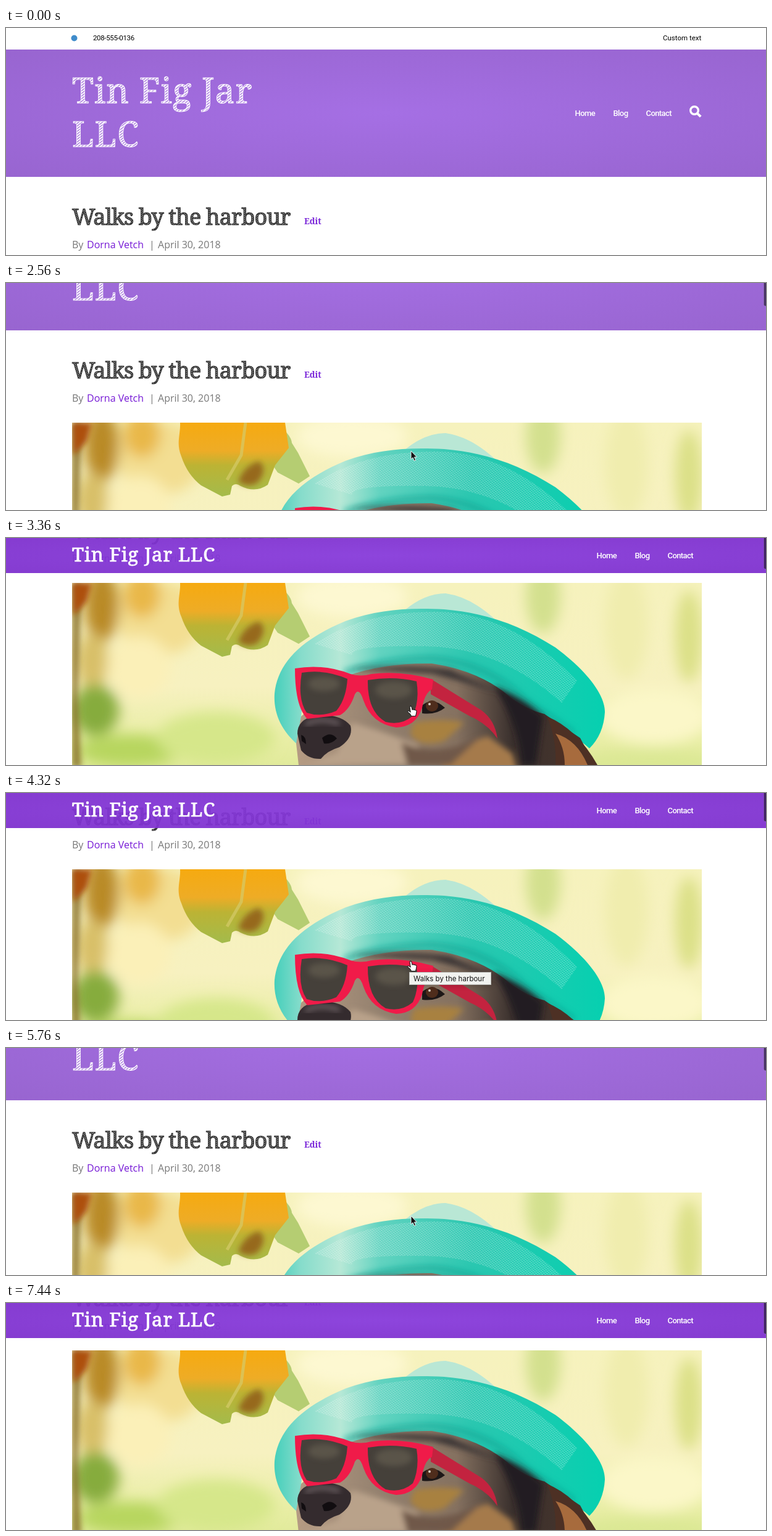
Recreate the animation shown at these times as an HTML page. Size 1231 by 369 pixels, loop 7840 ms.

```html
<!DOCTYPE html>
<html lang="en">
<head>
<meta charset="utf-8">
<title>Scrolling blog page</title>
<style>
  html, body { margin: 0; width: 100%; height: 100%; overflow: hidden; background: #fff; }
  svg { display: block; width: 1231px; height: 369px; }
  text { white-space: pre; }
  .logo { font: 57px "Noto Serif", serif; letter-spacing: 1px; fill: url(#hatch); stroke: #fff; stroke-width: .9; }
  .logo.small { font-size: 31px; letter-spacing: .9px; fill: #fff; stroke-width: .8; }
  .title { font: 36px "Noto Serif", serif; letter-spacing: -.9px; fill: url(#hatchDark); stroke: #333; stroke-width: 1.1; }
  .edit { font: bold 13.5px "Noto Serif", serif; fill: #7a26d9; }
  .by { font: 16px "Open Sans", sans-serif; fill: #777; }
  .by .link { fill: #7619d6; }
  .bar { font: 11.5px Roboto, sans-serif; fill: #000; }
  .menu { font: 500 13px Roboto, sans-serif; letter-spacing: -.6px; fill: #fff; }
  .tip { font: 11.5px Inter, sans-serif; fill: #111; }
</style>
</head>
<body>
<svg viewBox="0 0 1231 369">
  <defs>
    <pattern id="hatch" width="4" height="3.4" patternUnits="userSpaceOnUse" patternTransform="rotate(-38)">
      <rect width="4" height="2.1" fill="#fff"/>
    </pattern>
    <pattern id="hatchDark" width="3" height="2.6" patternUnits="userSpaceOnUse" patternTransform="rotate(-38)">
      <rect width="3" height="2.1" fill="#333"/>
    </pattern>
    <pattern id="weave" width="5" height="4" patternUnits="userSpaceOnUse" patternTransform="rotate(8)">
      <rect width="2.6" height="1.5" fill="#fff"/><rect x="2.5" y="2" width="2.6" height="1.5" fill="#fff"/>
    </pattern>
    <radialGradient id="banner" r=".707">
      <stop stop-color="#a56fe4"/><stop offset="1" stop-color="#9865d0"/>
    </radialGradient>
    <radialGradient id="sticky" r=".707">
      <stop stop-color="#8639da"/><stop offset="1" stop-color="#7d2fcd"/>
    </radialGradient>
    <linearGradient id="sky" x2="0" y2="1">
      <stop stop-color="#f6f2bd"/><stop offset=".4" stop-color="#f7f1c0"/>
      <stop offset=".6" stop-color="#e9eea6"/><stop offset="1" stop-color="#cbe07c"/>
    </linearGradient>
    <linearGradient id="straw">
      <stop stop-color="#45cfbb"/><stop offset=".08" stop-color="#86dccb"/><stop offset=".2" stop-color="#b6e8d6"/>
      <stop offset=".32" stop-color="#62d3c0"/><stop offset=".6" stop-color="#2ac7b0"/><stop offset="1" stop-color="#06d0b0"/>
    </linearGradient>
    <linearGradient id="leaf" x2="0" y2="1">
      <stop stop-color="#f6aa10"/><stop offset=".38" stop-color="#eeac26"/><stop offset=".58" stop-color="#bcb334"/><stop offset="1" stop-color="#a3bb4c"/>
    </linearGradient>
    <linearGradient id="fur">
      <stop stop-color="#b59b83"/><stop offset=".28" stop-color="#93806e"/><stop offset=".52" stop-color="#857160"/>
      <stop offset=".7" stop-color="#3a302d"/><stop offset="1" stop-color="#4b362b"/>
    </linearGradient>
    <filter id="blur" x="-50%" y="-50%" width="200%" height="200%"><feGaussianBlur stdDeviation="11"/></filter>
    <filter id="soft" x="-50%" y="-50%" width="200%" height="200%"><feGaussianBlur stdDeviation="5"/></filter>
    <clipPath id="photo"><rect x="107" y="73" width="1020" height="420"/></clipPath>
  </defs>

  <rect width="1231" height="369" fill="#fff"/>
  <g id="page">
    <circle cx="110.5" cy="16.5" r="5" fill="#3f8ccb"/>
    <text class="bar" x="141" y="20" letter-spacing="-.35">208-555-0136</text>
    <text class="bar" x="1064" y="20">Custom text</text>

    <rect y="35" width="1231" height="207" fill="url(#banner)"/>
    <text class="logo" x="107" y="122">Tin Fig Jar</text>
    <text class="logo" x="107" y="193">LLC</text>
    <g class="menu">
      <text x="921.5" y="143">Home</text><text x="983.5" y="143">Blog</text><text x="1036.5" y="143">Contact</text>
    </g>
    <g fill="none" stroke="#fff">
      <circle cx="1115" cy="134" r="6.3" stroke-width="3.4"/>
      <path d="M1119.8 138.8l5.4 5.4" stroke-width="4"/>
    </g>

    <text class="title" x="107" y="320">Walks by the harbour</text>
    <text class="edit" x="483" y="319">Edit</text>
    <g class="by">
      <text x="107" y="358">By</text><text class="link" x="131" y="358">Dorna Vetch</text>
      <text x="232" y="358">|</text><text x="246" y="358">April 30, 2018</text>
    </g>

    <g transform="translate(0 319)" clip-path="url(#photo)">
      <rect x="107" y="73" width="1020" height="420" fill="url(#sky)"/>
      <g id="blobs" filter="url(#blur)"></g>
      <path d="M107 73h17l-4 70-4 110 6 120h-15z" fill="#7d621a" opacity=".75" filter="url(#soft)"/>
      <path d="M107 73h32l-8 30-22 24z" fill="#ad4f08" filter="url(#soft)"/>

      <path d="M436 73Q462 92 463 106L473 122 492 160 474 172 440 154 424 130z" fill="#b5cd72"/>
      <path d="M282 73C283 92 275 106 284 128Q294 158 316 175L350 193 363 190 366 176Q372 170 380 176 404 188 424 174L436 142 458 114 452 73z" fill="url(#leaf)"/>
      <path d="M376 169Q386 142 410 136 425 148 408 170 394 180 376 169z" fill="#96691f" filter="url(#soft)"/>
      <path d="M388 73L381 126 358 166" fill="none" stroke="#d5cb68" stroke-width="5" opacity=".7"/>

      <path d="M645 118Q678 90 712 90 754 96 794 134z" fill="#b9e7d5"/>
      <path fill="url(#straw)" d="M474 337C445 313 433 283 435 253 440 204 476 166 550 135 604 116 650 113 710 116 780 122 835 143 890 178 942 217 970 255 970 283Q968 319 945 342C910 310 870 300 835 272L690 235H560L480 270z"/>
      <path d="M500 172Q580 118 700 120T925 232L900 268Q800 178 680 176T560 190z" fill="url(#weave)" opacity=".34"/>
      <path d="M548 219Q610 197 690 196 780 203 842 264L920 318" fill="none" stroke="#07a392" stroke-width="12" opacity=".5" filter="url(#soft)"/>

      <path d="M474 369L470 334 478 290 550 225Q610 203 690 204 760 215 805 249 838 278 872 286L930 325 970 400V493H470z" fill="url(#fur)"/>
      <g filter="url(#soft)">
        <path d="M660 300Q710 292 742 300L710 330Q668 342 655 318z" fill="#a8813f"/>
        <path d="M560 300L600 312 665 335 690 369H480L535 350z" fill="#b9a28a"/>
        <path d="M705 350L780 322 820 350 835 400H710z" fill="#a57a4b"/>
        <path d="M640 332Q700 360 770 322L720 369H650z" fill="#70594a"/>
        <path d="M790 240Q842 262 870 290L858 369H835Q830 300 790 240z" fill="#211d20"/>
        <path d="M560 214Q640 204 720 214L800 252 740 234 690 220 620 216z" fill="#3b3434"/>
      </g>
      <path d="M876 290Q925 310 958 369H890Q892 325 876 290z" fill="#4d3024"/>
      <path d="M890 318Q925 328 942 369H905Q905 340 890 318z" fill="#a76b3d"/>
      <path d="M674 272Q692 257 711 276 696 288 674 285z" fill="#1d1717"/>
      <ellipse cx="690" cy="273" rx="10" ry="9" fill="#4f2d1c"/>
      <circle cx="686" cy="270" r="2" fill="#d7d0c4"/>
      <path d="M472 318Q472 295 500 289 540 284 558 305 563 325 540 340 520 346 510 359 490 360 478 345z" fill="#342b2e"/>
      <path d="M485 303Q510 290 540 302" fill="none" stroke="#75696c" stroke-width="6" filter="url(#soft)"/>
      <path d="M512 325q14-12 24 1-10 10-21 8zM478 320q8 2 8 15l-7-5z" fill="#110d10"/>

      <path d="M688 229L770 280Q792 296 796 326 780 302 752 290L688 254z" fill="#c3233f"/>
      <path fill="#f01b49" d="M468 212Q515 204 558 221 574 226 592 221 640 215 692 230L690 246Q678 252 674 276 664 307 632 308 592 302 579 264 572 242 565 254 557 279 541 288L488 294Q468 274 468 212z"/>
      <g fill="#45403a">
        <path d="M479 219Q517 213 553 229 551 262 535 281 510 292 487 284 472 262 479 219z"/>
        <path d="M586 231Q627 224 665 233 670 265 659 289 641 305 615 299 585 282 586 231z"/>
      </g>
      <g fill="#756d5c" opacity=".45" filter="url(#soft)">
        <ellipse cx="515" cy="237" rx="26" ry="12"/><ellipse cx="628" cy="247" rx="30" ry="14"/>
      </g>
    </g>
  </g>

  <g id="fixed">
    <rect width="1231" height="57" fill="url(#sticky)" opacity=".94"/>
    <text class="logo small" x="107" y="38">Tin Fig Jar LLC</text>
    <g class="menu">
      <text x="956.5" y="33">Home</text><text x="1018.5" y="33">Blog</text><text x="1071.5" y="33">Contact</text>
    </g>
  </g>

  <rect id="thumb" x="1227.5" y="-40" width="8" rx="3" fill="#14101f" fill-opacity=".62" stroke="#fff" stroke-opacity=".12"/>

  <g id="tip">
    <rect x="654.5" y="293" width="132" height="20" fill="#000" opacity=".2" filter="url(#soft)"/>
    <rect x="653.5" y="291.5" width="132" height="20" fill="#f1f2ef" stroke="#b9bab6"/>
    <text class="tip" x="660" y="305.5">Walks by the harbour</text>
  </g>

  <g id="cursor">
    <path id="arrow" d="M0 0V13.5L3 10.8 5.2 16 7.6 15 5.4 10H9.4z" fill="#111" stroke="#fff" stroke-width=".9"/>
    <path id="hand" d="M-2 2Q-2 .4-.6.4.8.4 1 2L2 6.2Q4 5 4.8 6.4 6.6 5.6 7.2 7 8.8 6.6 9 8.4L8.6 12 7.4 16.5H.6L-1.4 13-5.4 9.6Q-5.8 7.6-3.6 8.2L-.8 10z" fill="#fff" stroke="#222" stroke-width="1.1"/>
  </g>
</svg>

<script>
  const LOOP = 7840, STEP = 80;
  const el = id => document.getElementById(id);
  const clamp = v => Math.max(0, Math.min(1, v));
  const show = (node, on) => node.setAttribute("visibility", on ? "visible" : "hidden");

  // Blurred background patches: x, y, rx, ry, colour
  const blobs = [
    [250, 130, 70, 60, "#f3de92"], [220, 92, 30, 38, "#e9b84a"],
    [155, 110, 28, 60, "#b98a28"], [140, 200, 26, 45, "#d8bf68"],
    [215, 210, 52, 50, "#fbf0b8"], [145, 280, 38, 42, "#86ac3c"],
    [200, 345, 85, 26, "#b7d65e"], [340, 325, 95, 42, "#d6e78a"],
    [560, 95, 90, 35, "#fdf8d1"], [870, 95, 28, 60, "#d3e08e"],
    [1005, 140, 35, 90, "#f0edae"], [1106, 160, 22, 75, "#dbe087"],
    [1050, 290, 90, 45, "#fbf7c8"], [1040, 368, 110, 24, "#dbe894"]
  ];
  el("blobs").innerHTML = blobs.map(([x, y, rx, ry, c]) =>
    `<ellipse cx="${x}" cy="${y}" rx="${rx}" ry="${ry}" fill="${c}"/>`).join("");

  // Scroll position over time: ms, px
  const stops = [
    [0, 0], [1440, 0], [1760, 27], [2560, 165], [3360, 319], [4080, 319],
    [4720, 107], [5200, 0], [5360, 0], [5760, 157], [6560, 315], [LOOP, 315]
  ];

  function slope(i) {
    const a = stops[i - 1], b = stops[i], c = stops[i + 1];
    if (!a || !c || a[1] === b[1] || b[1] === c[1]) return 0;
    return (c[1] - a[1]) / (c[0] - a[0]);
  }

  function scrollAt(t) {
    const i = stops.findIndex((s, n) => n && t <= s[0]) - 1;
    const [t0, y0] = stops[i], [t1, y1] = stops[i + 1];
    const d = t1 - t0, u = (t - t0) / d, v = 1 - u;
    return Math.round(y0 * v * v * (1 + 2 * u) + y1 * u * u * (3 - 2 * u)
      + d * u * v * (slope(i) * v - slope(i + 1) * u));
  }

  function cursorAt(t) {
    const enter = (1 - clamp((t - 240) / 480)) ** 2;
    const leave = clamp((t - 6880) / 560) ** 2;
    return [656 + 10 * enter + 22 * leave, 273 + 34 * enter + 110 * leave];
  }

  function draw(ms) {
    const t = Math.floor((ms % LOOP) / STEP) * STEP;
    const y = scrollAt(t);
    el("page").setAttribute("transform", `translate(0 ${-y})`);

    // The compact header fades in past 200px and vanishes at once on the way back
    const fadeStart = t < 5000 ? 2700 : 5880;
    el("fixed").setAttribute("opacity", y < 200 ? 0 : clamp((t - fadeStart) / 200));

    show(el("thumb"), t >= 1520);
    el("thumb").setAttribute("height", 63.5 + y * .085);
    show(el("tip"), t >= 4160 && t < 4880);

    const hand = (t >= 2800 && t < 4880) || t >= 6000;
    const visible = t >= 240 && t < 7440;
    show(el("hand"), visible && hand);
    show(el("arrow"), visible && !hand);
    el("cursor").setAttribute("transform", `translate(${cursorAt(t)})`);
  }

  const start = performance.now();
  function frame() {
    draw(performance.now() - start);
    requestAnimationFrame(frame);
  }
  frame();
</script>
</body>
</html>
```
